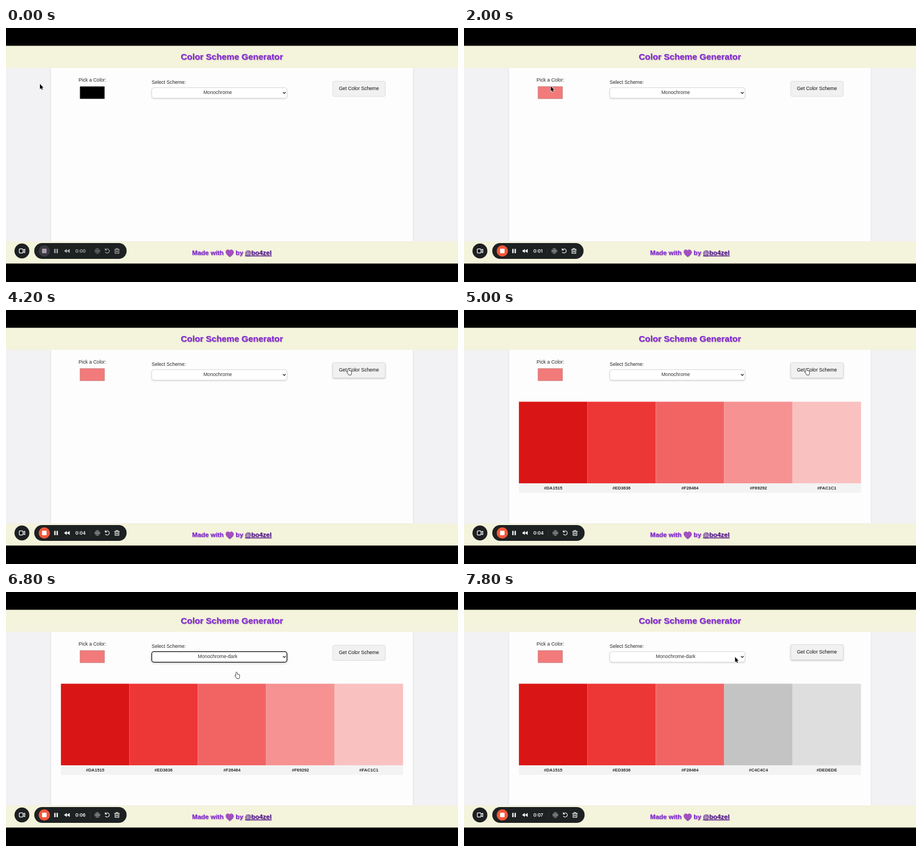
Recreate the animation shown at these times as an HTML page with a canvas. Size 800 px wide and 450 px high, loop 8 s.

```html
<!DOCTYPE html>
<html lang="en">
<head>
<meta charset="utf-8">
<title>Color Scheme Generator</title>
<style>
  html, body { margin: 0; width: 100%; height: 100%; overflow: hidden; background: #000; }
  canvas { display: block; }
</style>
</head>
<body>
<canvas id="stage" width="800" height="450"></canvas>
<script>
const ctx = document.getElementById('stage').getContext('2d');
const LOOP = 8000, STEP = 200;
const SANS = '"Liberation Sans", Arial, sans-serif';
const UI = 'Inter, "Liberation Sans", sans-serif';

const RED = ['#DA1515', '#ED3636', '#F26464', '#F69292', '#FAC1C1'];
const DARK = [...RED.slice(0, 3), '#C4C4C4', '#DEDEDE'];

// Each track lists [start time, value...]; a value holds until the next one.
const CURSOR = [
  [0, 'arrow', 60, 99], [200, 'arrow', 98, 101], [400, 'arrow', 143, 103],
  [600, 'arrow', 154.5, 103], [1400, 'arrow', 153.6, 103],
  [2800, 'arrow', 187, 106], [3000, 'none', 0, 0],
  [3400, 'hand', 603, 103.5], [5200, 'hand', 600, 105],
  [5400, 'arrow', 552, 111], [5600, 'arrow', 492, 114], [5800, 'arrow', 479.7, 115],
  [6800, 'hand', 405, 141.8], [7000, 'arrow', 488, 131],
  [7200, 'hand', 594, 106], [7400, 'hand', 603, 103.5], [7800, 'arrow', 479.7, 115]
];
const LIFT = [[0, 0], [3400, .5], [3600, 1], [5400, .4], [5600, 0], [7200, .5], [7400, 1]];
const CLOCK = [[0, 0], [1200, 1], [2200, 2], [3000, 3], [4200, 4], [5200, 5], [6200, 6], [7200, 7]];

const at = (track, t) => track.filter(k => k[0] <= t).pop().slice(1);

const ARROW = new Path2D('M0 0V9.2L2.1 7.4L3.5 10.4L5 9.7L3.7 6.8H6.3Z');
const HAND = new Path2D('M2.2 6.2V1.4Q2.2.5 3 .5T3.8 1.4V4.3Q4.8 3.7 5.4 4.5Q6.3 4 6.9 4.9Q8.2 4.5 8.3 5.9V8Q8.3 9.2 7.6 10V11.3H3.6V10.4L1 7.2Q.3 6.2 1 5.9Q1.5 5.6 2.2 6.2Z');
const HEART = new Path2D('M0 6C-3 3.7-6.4 1-6.4-2.2C-6.4-6.4-1.3-7.2 0-3.8C1.3-7.2 6.4-6.4 6.4-2.2C6.4 1 3 3.7 0 6Z');
const CAMERA = new Path2D('M-4.9-2.6Q-4.9-3.6-3.9-3.6H.7Q1.7-3.6 1.7-2.6V2.6Q1.7 3.6.7 3.6H-3.9Q-4.9 3.6-4.9 2.6ZM1.7-1.1L4.9-3V3L1.7 1.1');
const REWIND = new Path2D('M0-3.6V3.6L-5 0ZM5-3.6V3.6L0 0Z');
const RESTART = new Path2D('M-3.4-1.7A3.7 3.7 0 1 1-3.2 2.1M-3.6-4.2V-1.5H-.9');
const TRASH = new Path2D('M-4.3-2.8H4.3M-1.6-2.8V-4.3H1.6V-2.8M-3.3-2.8V4.2H3.3V-2.8M-1.1-.8V2.3M1.1-.8V2.3');

function rect(x, y, w, h, fill) {
  ctx.fillStyle = fill;
  ctx.fillRect(x, y, w, h);
}

function box(x, y, w, h, r, fill, stroke, line = .8) {
  ctx.beginPath();
  ctx.roundRect(x, y, w, h, r);
  ctx.fillStyle = fill;
  ctx.fill();
  if (!stroke) return;
  ctx.shadowColor = 'transparent';
  ctx.strokeStyle = stroke;
  ctx.lineWidth = line;
  ctx.stroke();
}

function disc(x, y, r, fill) {
  ctx.beginPath();
  ctx.arc(x, y, r, 0, Math.PI * 2);
  ctx.fillStyle = fill;
  ctx.fill();
}

function text(str, x, y, font, fill, align = 'left') {
  ctx.font = font;
  ctx.textAlign = align;
  ctx.fillStyle = fill;
  ctx.fillText(str, x, y);
}

function shape(path, x, y, fill, stroke, line = 1) {
  ctx.save();
  ctx.translate(x, y);
  ctx.lineWidth = line;
  ctx.lineJoin = ctx.lineCap = 'round';
  if (stroke) { ctx.strokeStyle = stroke; ctx.stroke(path); }
  if (fill) { ctx.fillStyle = fill; ctx.fill(path); }
  ctx.restore();
}

function shadowed(color, dx, dy, blur, draw) {
  ctx.save();
  ctx.shadowColor = color;
  ctx.shadowOffsetX = dx;
  ctx.shadowOffsetY = dy;
  ctx.shadowBlur = blur;
  draw();
  ctx.restore();
}

function page() {
  rect(0, 0, 800, 450, '#000');
  rect(0, 32, 800, 385, '#f2f2f4');
  shadowed('rgba(0,0,0,.07)', 0, 0, 4, () => rect(80, 70, 640, 308, '#fdfdfd'));
  rect(0, 31.5, 800, 39, '#f4f3db');
  rect(0, 378.5, 800, 38.8, '#f4f3db');

  shadowed('rgba(75,0,130,.5)', .8, .8, 1, () => {
    text('Color Scheme Generator', 399.7, 56, 'bold 15.36px ' + SANS, '#8429d6', 'center');
    const font = 'bold 11.52px ' + SANS;
    text('Made with', 329.3, 402, font, '#8429d6');
    shape(HEART, 395.6, 398.8, '#a44fc0', '#8136b5', .8);
    text('by', 406.3, 402, font, '#8429d6');
    text('@bo4zel', 422.8, 402, font, '#50198a');
    const w = ctx.measureText('@bo4zel').width;
    rect(422.8, 403.1, w, 1, '#50198a');
  });
}

function controls(t) {
  const font = '8.64px ' + SANS;
  const [lift] = at(LIFT, t);
  const focus = t >= 5800 && t < 7400;

  text('Pick a Color:', 128.5, 95, font, '#292929');
  box(131, 103.7, 43.3, 21.6, 0, t < 1400 ? '#000' : '#f37a7a', t < 1400 ? '#555' : '#b58080', .7);

  text('Select Scheme:', 257.7, 98.6, font, '#292929');
  shadowed(focus ? 'rgba(0,0,0,.3)' : 'rgba(0,0,0,.16)', 0, 1.2, focus ? 4 : 3, () =>
    box(257.9, 105.7, 239.4, 18.6, 4, '#fff', focus ? '#111' : '#cfcfcf', focus ? 1.3 : .8));
  text(t < 6800 ? 'Monochrome' : 'Monochrome-dark', 374.6, 117.3, font, '#333', 'center');
  shape(new Path2D('M-2-1L0 1L2-1'), 492.6, 115, null, '#222', 1.2);

  shadowed(`rgba(0,0,0,${.28 * lift})`, 0, 1.3, 3, () =>
    box(578.3, 94.3 - lift, 93, 27, 2.5, '#f1f1f2', '#d8d8d8', .8));
  text('Get Color Scheme', 624.6, 110 - lift, font, '#111', 'center');
}

function palette(colors) {
  const w = 121.1;
  rect(97.2, 307, w * 5, 16.8, '#f3f3f3');
  colors.forEach((c, i) => {
    const x = 97.2 + i * w;
    rect(x, 162.5, w, 144.5, c);
    text(c, x + w / 2, 317.8, 'bold 7.68px ' + SANS, '#2b2b2b', 'center');
  });
}

function recorder(t) {
  const live = t >= 200;
  const ink = live ? '#fff' : '#b3b1b5';
  const [sec] = at(CLOCK, t);
  const shift = sec === 1 ? -1.9 : 0;
  const y = 395;

  disc(28.2, y, 13.2, '#1d1f21');
  shape(CAMERA, 28.4, y, null, '#fff', 1.2);

  box(50, 381, 163.5 + shift, 28, 14, '#1e2122');
  disc(67.8, y, 10, live ? '#f4573b' : '#3b3a43');
  box(63.8, 391, 8, 8, 1, live ? '#fff' : '#a99bab');
  box(85.4, 391.3, 2.3, 7.6, .6, ink);
  box(89.5, 391.3, 2.3, 7.6, .6, ink);
  shape(REWIND, 107.7, y, ink);
  text('0:0' + sec, 122.8, 397.8, '600 7.9px ' + UI, ink);

  rect(148.6 + shift, 388, .8, 14, '#303335');
  for (let i = -2; i <= 2; i++)
    for (let j = -2; j <= 2; j++)
      if (Math.abs(i) + Math.abs(j) < 4)
        disc(161.7 + shift + i * 2.1, y + j * 2.1, Math.abs(i) + Math.abs(j) < 3 ? .75 : .5, ink);
  shape(RESTART, 179.3 + shift, y, null, ink, 1.1);
  shape(TRASH, 196.4 + shift, y, null, ink, 1.1);
}

function pointer(t) {
  const [kind, x, y] = at(CURSOR, t);
  if (kind === 'arrow') shape(ARROW, x, y, '#080808', '#fff', 1.3);
  if (kind === 'hand') shape(HAND, x, y, '#fff', '#222', 1.5);
}

function frame(now) {
  const t = Math.floor(now % LOOP / STEP) * STEP;
  page();
  controls(t);
  if (t >= 5000) palette(t < 7800 ? RED : DARK);
  recorder(t);
  pointer(t);
  requestAnimationFrame(frame);
}

const start = performance.now();
const tick = frame;
frame = () => tick(Math.max(0, performance.now() - start));
frame();
</script>
</body>
</html>
```
